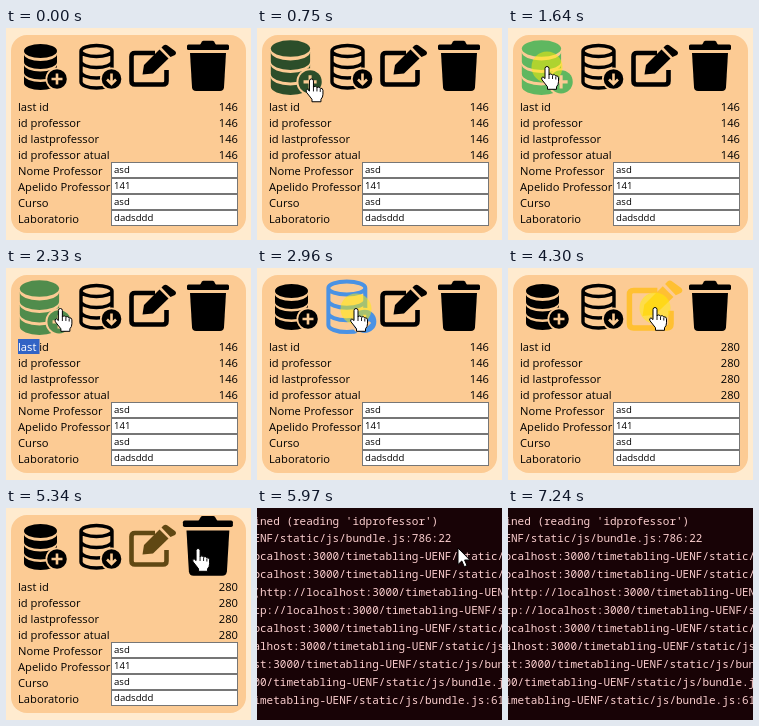
An HTML page with a canvas for the animation above (7.84 s loop, 245 by 212 pixels).

```html
<!DOCTYPE html>
<html lang="es">
<head>
<meta charset="utf-8">
<title>Professor form</title>
<style>
html, body { margin: 0; width: 100%; height: 100%; overflow: hidden; }
canvas { display: block; }
</style>
</head>
<body>
<canvas id="stage" width="245" height="212"></canvas>
<script>
const ctx = document.getElementById('stage').getContext('2d');
const LOOP = 7840, ERROR_AT = 5830;
const CARD = '#fccb94', BLACK = [0, 0, 0];
const SANS = '"Open Sans", "Noto Sans", sans-serif';
const MONO = '"Noto Sans Mono", "DejaVu Sans Mono", monospace';

const labels = ['last id', 'id professor', 'id lastprofessor', 'id professor atual',
  'Nome Professor', 'Apelido Professor', 'Curso', 'Laboratorio'];
const values = ['asd', '141', 'asd', 'dadsddd'];

const url = '(http://localhost:3000/timetabling-UENF/static/js/bundle.js:61';
const trace = ["ined (reading 'idprofessor')", 'ENF/static/js/bundle.js:786:22',
  ...[9, 9, 0, 3, 9, 11, 15, 20, 24].map(n => url.slice(n))];

// time, x, y of the pointer's hot spot
const route = [[200, 205, 187], [300, 185, 172], [540, 62, 62], [960, 47, 41], [1170, 39, 39],
  [2000, 39, 39], [2330, 54, 41], [2420, 88, 41], [2750, 99, 41], [3670, 99, 41],
  [4000, 147, 40], [4850, 147, 40], [5200, 188, 41], [5340, 192, 41], [5480, 202, 41],
  [5829, 202, 41], [5830, 201, 40], [6800, 201, 40], [7230, 246, 212]];
const presses = [[1640, 1750], [1830, 1920], [2890, 2990], [3480, 3590], [4250, 4370], [5760, 5830]];

const icons = [
  { x: 40, y: 36, on: 540, off: 2370, color: [80, 140, 76], active: [95, 183, 96], draw: addIcon },
  { x: 94, y: 38.5, on: 2370, off: 3820, color: [74, 146, 228], draw: loadIcon },
  { x: 147, y: 38.5, on: 3820, off: 5100, color: [255, 192, 50], draw: editIcon },
  { x: 202.5, y: 37.5, on: 5100, off: LOOP, color: BLACK, draw: trashIcon }
];

const handPath = new Path2D('M-2 1.5a2 2 0 0 1 4 0v6q2-1.5 3.5.5q2-1 3.3.8q2.4-.5 2.7 2v4q0 3-2 5v2.5h-9v-2.5l-5.5-7q-1.2-2.5 1-3l2 1.8z');
const arrowPath = new Path2D('M0 0V16.5L3.8 13L6.3 18.8L9 17.6L6.6 12H11.8Z');
const beamPath = new Path2D('M-3-8H-1L0-7L1-8H3M0-7V7M-3 8H-1L0 7L1 8H3');

const within = (t, [a, b]) => t >= a && t < b;
const pressed = t => presses.some(p => within(t, p));
const fill = d => ctx.fill(new Path2D(d));
const stroke = (d, width) => { ctx.lineWidth = width; ctx.stroke(new Path2D(d)); };

function rounded(x, y, w, h, r) {
  ctx.beginPath();
  ctx.roundRect(x, y, w, h, r);
  ctx.fill();
}

function disc(x, y, r) {
  ctx.beginPath();
  ctx.arc(x, y, r, 0, 7);
  ctx.fill();
}

function text(s, x, y, font, color, align = 'left') {
  ctx.font = font;
  ctx.fillStyle = color;
  ctx.textAlign = align;
  ctx.fillText(s, x, y);
}

function badge(x, y, mark) {
  const color = ctx.fillStyle;
  ctx.fillStyle = CARD;
  disc(x, y, 11.5);
  ctx.fillStyle = color;
  disc(x, y, 9.8);
  ctx.strokeStyle = CARD;
  stroke(mark, 2.6);
}

function addIcon() {
  ctx.beginPath();
  ctx.ellipse(34.5, 23, 16.5, 7, 0, 0, 7);
  ctx.fill();
  for (const y of [26, 36.5, 47]) fill(`M18 ${y}a16.5 7 0 0 0 33 0v8a16.5 7 0 0 1-33 0z`);
  badge(51, 51, 'M45.5 51h11M51 45.5v11');
}

function loadIcon() {
  stroke('M75 23a15.5 5.5 0 0 1 31 0a15.5 5.5 0 0 1-31 0V54a15.5 6 0 0 0 31 0V23M75 33.5a15.5 6 0 0 0 31 0M75 44a15.5 6 0 0 0 31 0', 3.4);
  badge(105.5, 51, 'M105.5 45.5v10M101 51.5l4.5 4.5l4.5-4.5');
}

function editIcon() {
  ctx.lineJoin = 'round';
  stroke('M149 25H129q-3.5 0-3.5 3.5V53q0 3.5 3.5 3.5h28q3.5 0 3.5-3.5V42', 4.6);
  fill('M136.5 46.5L138 37L153.5 21.5L162.5 30.5L147 45.5Z');
  fill('M155.5 19.5l2-2q2-1.5 4 0l7.5 5.5q2 2 0 4l-4.5 2z');
}

function trashIcon() {
  fill('M194 17l2-3.5q.5-.8 1.5-.8h9q1 0 1.5.8l2 3.5z');
  rounded(181, 16.5, 42, 5.5, 1.5);
  fill('M184 25h36l-2 34.2q-.4 3.8-4 3.8h-24q-3.6 0-4-3.8z');
}

function paintIcon(icon, t) {
  const hover = within(t, [icon.on, icon.off]);
  const target = hover && icon.active && pressed(t) ? icon.active : icon.color;
  let k = 0;
  if (hover) k = Math.min(1, (t - icon.on) / 380);
  else if (t >= icon.off) k = Math.max(0, 1 - (t - icon.off) / 480) ** 1.4;
  ctx.save();
  ctx.translate(icon.x, icon.y);
  if (hover) ctx.scale(1.19, 1.19);
  ctx.translate(-icon.x, -icon.y);
  ctx.fillStyle = ctx.strokeStyle = `rgb(${target.map(c => Math.round(c * k))})`;
  icon.draw();
  ctx.restore();
}

function pointerAt(t) {
  const i = route.findIndex(p => p[0] > t);
  if (i < 1) return null;
  const [t0, x0, y0] = route[i - 1], [t1, x1, y1] = route[i];
  const k = (t - t0) / (t1 - t0);
  return { x: x0 + (x1 - x0) * k, y: y0 + (y1 - y0) * k };
}

function paintPointer(t, p) {
  const error = t >= ERROR_AT;
  ctx.save();
  ctx.translate(p.x, p.y);
  if (!error && pressed(t)) {
    ctx.fillStyle = 'rgba(255,240,0,.5)';
    disc(0, 0, 15.5);
  }
  ctx.strokeStyle = '#000';
  ctx.lineWidth = 1;
  if (!error && p.x > 105 && p.y > 134) ctx.stroke(beamPath);
  else {
    const shape = !error && p.y < 67 ? handPath : arrowPath;
    ctx.fillStyle = '#fff';
    ctx.fill(shape);
    ctx.stroke(shape);
    if (shape === handPath) stroke('M2 7v5M5.5 8.5v3.5M8.8 9.5v3', 0.9);
  }
  ctx.restore();
}

function paintForm(t, pointer) {
  const font = '11.2px ' + SANS;
  ctx.fillStyle = '#ffebcf';
  ctx.fillRect(0, 0, 245, 212);
  ctx.fillStyle = CARD;
  rounded(5, 7, 235, 198, 16);
  labels.forEach((label, i) => {
    const y = 83 + 16 * i;
    text(label, 12, y, font, '#000');
    if (i < 4) {
      text(t < 3000 ? '146' : '280', 232, y, font, '#000', 'right');
      return;
    }
    const top = y - 13;
    const hover = pointer && pointer.x > 105 && pointer.y >= top && pointer.y < top + 16;
    ctx.fillStyle = hover ? '#333' : '#767676';
    ctx.fillRect(105, top, 127, 16);
    ctx.fillStyle = '#fff';
    ctx.fillRect(106, top + 1, 125, 14);
    text(values[i - 4], 108, top + 11, '9.6px ' + SANS, '#000');
  });
  if (within(t, [1830, 2890])) {
    ctx.fillStyle = '#3163c5';
    ctx.fillRect(12, 71, 21.5, 15);
    text('last', 12, 83, font, '#fff');
  }
  icons.forEach(icon => paintIcon(icon, t));
}

function paintError() {
  ctx.fillStyle = '#180306';
  ctx.fillRect(0, 0, 245, 212);
  trace.forEach((line, i) => text(line, -3.6, 16.5 + 17.9 * i, '11px ' + MONO, '#fccfcf'));
}

function frame(now) {
  const t = now % LOOP;
  const pointer = pointerAt(t);
  if (t < ERROR_AT) paintForm(t, pointer);
  else paintError();
  if (pointer) paintPointer(t, pointer);
  requestAnimationFrame(() => frame(performance.now()));
}
frame(performance.now());
</script>
</body>
</html>
```
